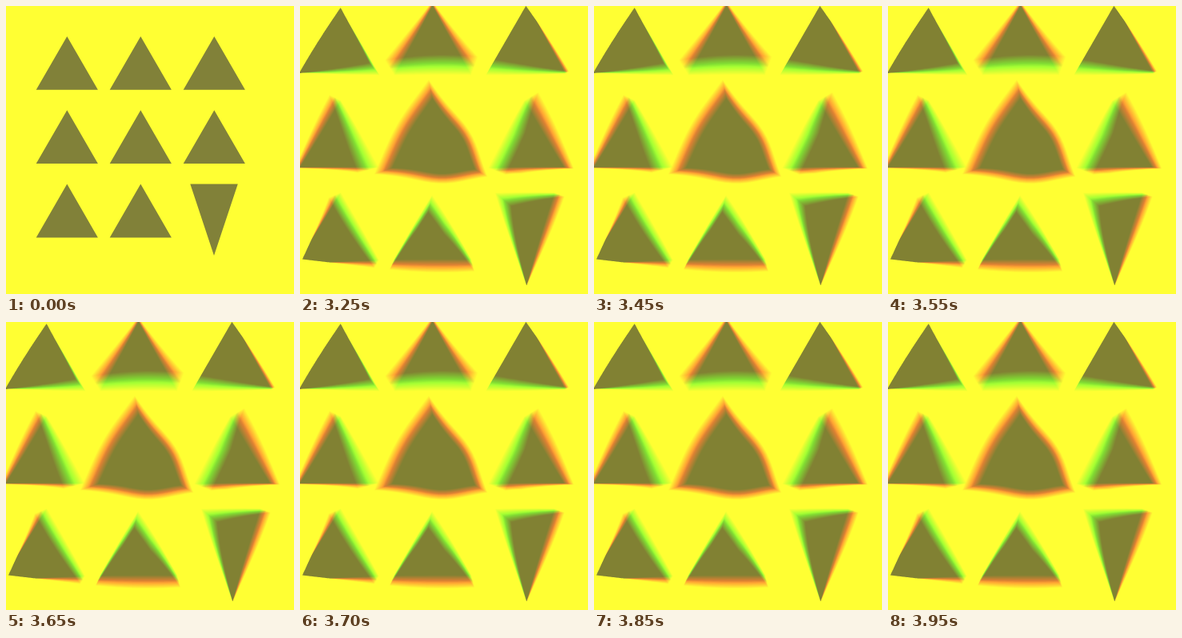
An HTML page with a canvas that plays this animation: 360 by 360 pixels, repeating every 4000 ms.

```html
<!DOCTYPE html>
<html lang="en">
<head>
<meta charset="utf-8">
<title>Nine triangles</title>
<style>
  html, body { margin: 0; width: 100%; height: 100%; overflow: hidden; background: #ffff33; }
  canvas { display: block; }
</style>
</head>
<body>
<canvas id="stage" width="360" height="360"></canvas>
<script>
const SIZE = 360, LOOP = 4000, SWITCH = 3250;
const YELLOW = '#ffff33', OLIVE = '#818139';
const CENTER = { x: 178, y: 180 };
const LAYERS = 18, SHADE = 7, EDGE_STEPS = 20;

const mix = (a, b, t) => a + (b - a) * t;

function gridTriangles() {
  const triangles = [];
  for (let i = 0; i < 9; i++) {
    const x = 76.3 + i % 3 * 92, y = 38 + Math.floor(i / 3) * 92.3;
    triangles.push(i < 8
      ? [[x, y], [x + 38.6, y + 66.8], [x - 38.6, y + 66.8]]
      : [[x - 30, y], [x + 29.5, y], [x - 0.3, y + 89.3]]);
  }
  return triangles;
}

// Pushes a point away from the center; the spread closes towards the rim.
function push([x, y], amount) {
  const dx = x - CENTER.x, dy = y - CENTER.y, r = Math.hypot(dx, dy);
  const far = Math.min(44, 18 + 0.42 * r);
  const near = Math.min(far, 12 + 32 * (r / 155) ** 2.2);
  const d = mix(near, far, amount) / r;
  return [x + dx * d, y + dy * d];
}

function subdivide(corners) {
  return corners.flatMap(([x, y], i) => {
    const [nx, ny] = corners[(i + 1) % corners.length];
    return Array.from({ length: EDGE_STEPS }, (_, k) =>
      [mix(x, nx, k / EDGE_STEPS), mix(y, ny, k / EDGE_STEPS)]);
  });
}

function fillShapes(ctx, shapes, color) {
  ctx.fillStyle = color;
  ctx.beginPath();
  for (const points of shapes) {
    points.forEach(([x, y], i) => i ? ctx.lineTo(x, y) : ctx.moveTo(x, y));
    ctx.closePath();
  }
  ctx.fill();
}

function makeScene(draw) {
  const canvas = document.createElement('canvas');
  canvas.width = canvas.height = SIZE;
  const ctx = canvas.getContext('2d');
  ctx.fillStyle = YELLOW;
  ctx.fillRect(0, 0, SIZE, SIZE);
  draw(ctx);
  return canvas;
}

// Each layer takes a little of one channel away, so they add up to a blur.
function smear(ctx, shapes, color, from, to) {
  ctx.globalCompositeOperation = 'difference';
  for (let i = 0; i < LAYERS; i++) {
    const amount = mix(from, to, (i + 0.5) / LAYERS);
    fillShapes(ctx, shapes.map(points => points.map(p => push(p, amount))), color);
  }
}

const triangles = gridTriangles();
const plain = makeScene(ctx => fillShapes(ctx, triangles, OLIVE));
const burst = makeScene(ctx => {
  const outlines = triangles.map(subdivide);
  smear(ctx, outlines, `rgb(${SHADE},0,0)`, 0, 0.58);
  smear(ctx, outlines, `rgb(0,${SHADE},0)`, 0.42, 1);
});

const stage = document.getElementById('stage').getContext('2d');
const start = performance.now();

function render(time) {
  stage.drawImage(time < SWITCH ? plain : burst, 0, 0);
}

function tick() {
  render((performance.now() - start) % LOOP);
  requestAnimationFrame(tick);
}
tick();
</script>
</body>
</html>
```
